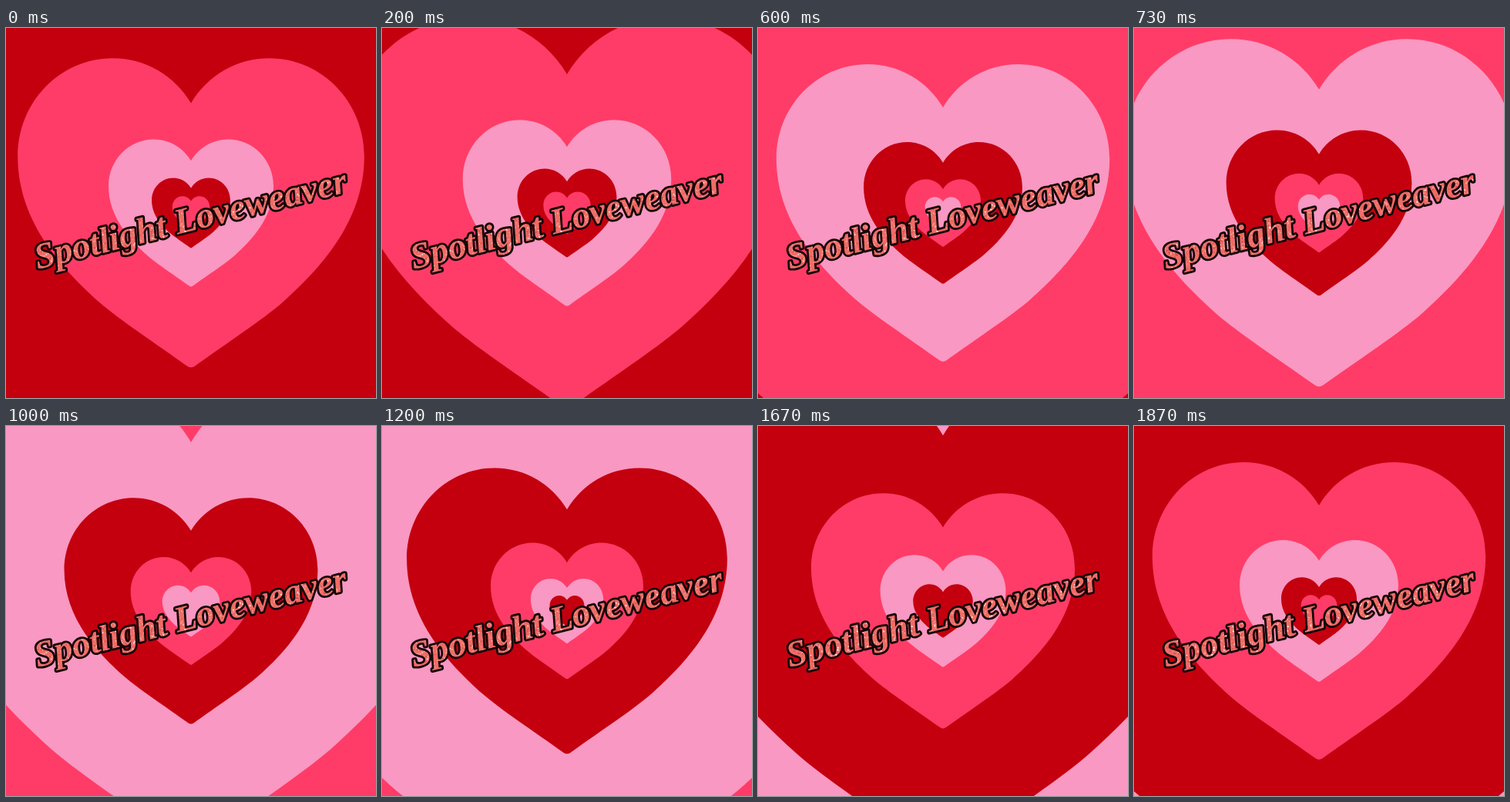
An HTML page with a canvas for the animation above (1.94 s loop, 480 by 480 pixels).

```html
<!DOCTYPE html>
<html lang="en">
<head>
<meta charset="utf-8">
<title>Spotlight Loveweaver</title>
<style>
  html, body { margin: 0; width: 100%; height: 100%; overflow: hidden; background: #c4000f; }
  canvas { display: block; width: 480px; height: 480px; }
</style>
</head>
<body>
<canvas id="stage" width="480" height="480"></canvas>
<script>
const SIZE = 480, MID = SIZE / 2;
const LOOP = 1940;          // ms
const STEP = 200 / 3;       // ms per picture, 15 per second
const RATIO = 2.1;          // size of each heart against the next one inside
const STEPS_PER_LEVEL = 9.5;
const BASE = 449.5;         // width of the large pink heart at the start
const SMALLEST = 40;
const RED = '#c4000f', PINK = '#ff3c67', LIGHT = '#f998c2';
const COLORS = [PINK, LIGHT, RED];
const TITLE = 'Spotlight Loveweaver';

const ctx = document.getElementById('stage').getContext('2d');

// Heart of width 1 around the origin: right side down, left side up.
const heart = new Path2D();
heart.moveTo(0, -0.317);
heart.bezierCurveTo(0.047, -0.396, 0.131, -0.4465, 0.226, -0.4465);
heart.bezierCurveTo(0.378, -0.4465, 0.5, -0.32, 0.5, -0.163);
heart.bezierCurveTo(0.5, 0.03, 0.364, 0.168, 0.264, 0.258);
heart.bezierCurveTo(0.21, 0.3055, 0.1, 0.378, 0.01, 0.4425);
heart.quadraticCurveTo(0, 0.449, -0.01, 0.4425);
heart.bezierCurveTo(-0.1, 0.378, -0.21, 0.3055, -0.264, 0.258);
heart.bezierCurveTo(-0.364, 0.168, -0.5, 0.03, -0.5, -0.163);
heart.bezierCurveTo(-0.5, -0.32, -0.378, -0.4465, -0.226, -0.4465);
heart.bezierCurveTo(-0.131, -0.4465, -0.047, -0.396, 0, -0.317);
heart.closePath();

function seeded(seed) {
  let s = seed;
  return () => (s = (s * 16807) % 2147483647) / 2147483647;
}

// The title with one of three glitter patterns.
function makeTitle(phase) {
  const layer = document.createElement('canvas');
  layer.width = layer.height = SIZE;
  const c = layer.getContext('2d');
  const rand = seeded(4021 + phase * 977);
  const place = () => {
    c.setTransform(1, 0, 0, 1, 0, 0);
    c.translate(41, 313);
    c.rotate(-14 * Math.PI / 180);
  };
  c.font = 'italic bold 47px "Liberation Serif", "Times New Roman", serif';
  c.lineJoin = 'round';
  place();
  c.fillStyle = '#f06c66';
  c.fillText(TITLE, 0, 0);

  c.setTransform(1, 0, 0, 1, 0, 0);
  c.globalCompositeOperation = 'source-atop';
  const white = phase === 1 ? 0.13 : 0.07;
  for (let n = 0; n < 9000; n++) {
    const x = 30 + rand() * 420, y = 170 + rand() * 160;
    const pick = rand(), d = 1 + rand();
    c.fillStyle = pick < white ? '#fff4f0'
      : pick < 0.35 ? '#ffa098'
      : pick < 0.6 ? '#cc4e4c' : '#f06c66';
    c.fillRect(x, y, d, d);
  }

  c.globalCompositeOperation = 'destination-over';
  place();
  c.strokeStyle = '#140406';
  c.lineWidth = 5.5;
  c.strokeText(TITLE, 0, 0);
  return layer;
}

const titles = [0, 1, 2].map(makeTitle);

// Pictures change on times rounded to 10 ms.
function stepAt(t) {
  const i = Math.round(t / STEP);
  return Math.round(i * STEP / 10) * 10 > t ? i - 1 : i;
}

function draw(step) {
  const zoom = Math.pow(RATIO, step / STEPS_PER_LEVEL);
  ctx.setTransform(1, 0, 0, 1, 0, 0);
  ctx.fillStyle = RED;
  ctx.fillRect(0, 0, SIZE, SIZE);
  for (let level = -1; level < 8; level++) {
    const width = BASE * zoom * Math.pow(RATIO, -level);
    if (width < SMALLEST) break;
    ctx.setTransform(width, 0, 0, width, MID, MID);
    ctx.fillStyle = COLORS[(level + 3) % 3];
    ctx.fill(heart);
  }
  ctx.setTransform(1, 0, 0, 1, 0, 0);
  ctx.drawImage(titles[step % 3], 0, 0);
}

const start = performance.now();
let shown = -1;
function tick() {
  const step = Math.min(28, stepAt((performance.now() - start) % LOOP));
  if (step !== shown) draw(shown = step);
  requestAnimationFrame(tick);
}
tick();
</script>
</body>
</html>
```
